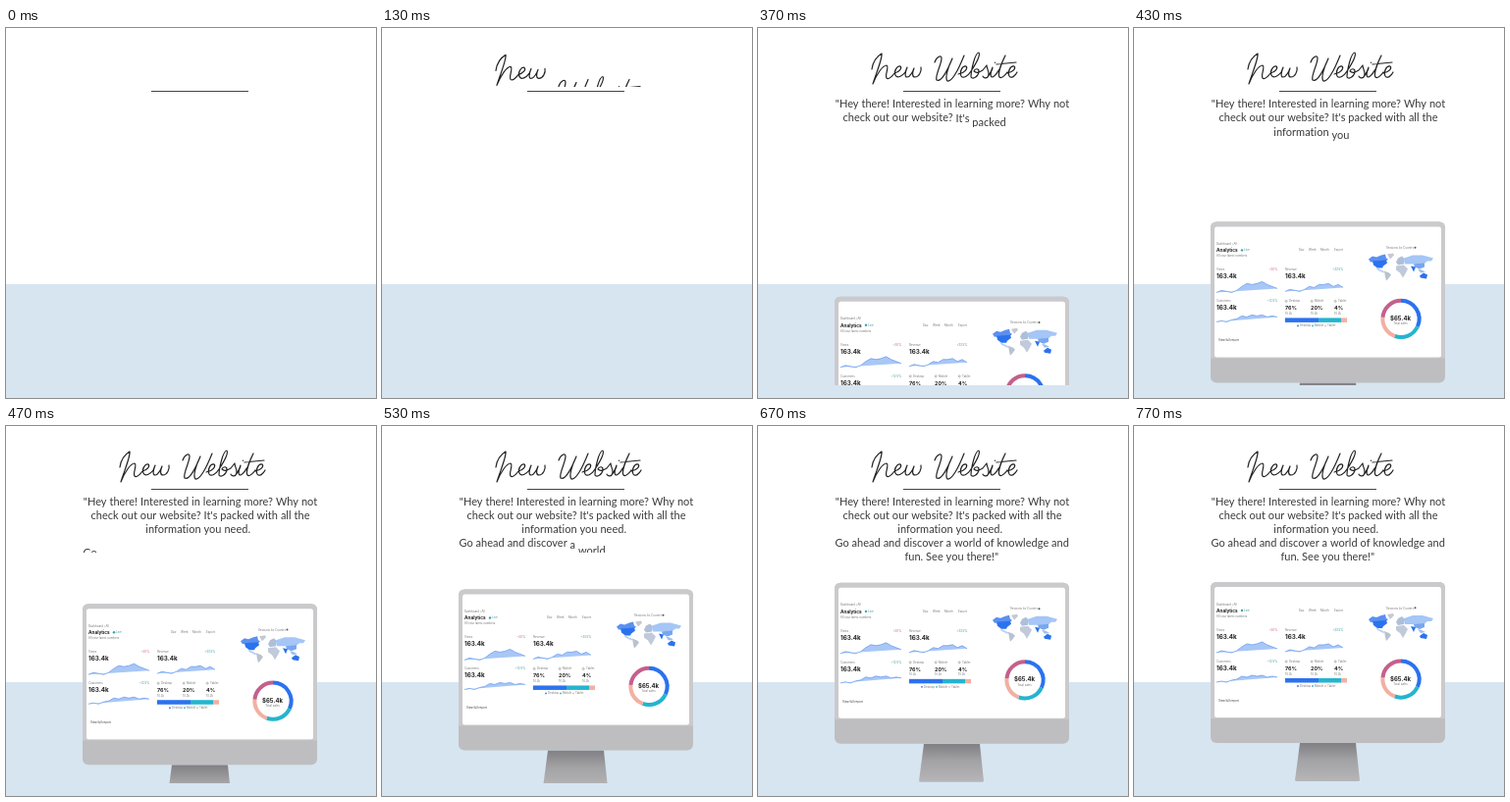
These frames come from a looping animation (377 px wide and 377 px high, 1.51 s). An HTML page:

```html
<!DOCTYPE html>
<html lang="en">
<head>
<meta charset="utf-8">
<title>New Website</title>
<style>
  html, body { margin: 0; width: 100%; height: 100%; overflow: hidden; background: #fff; }
  svg { position: absolute; left: 0; top: 0; }
  .line {
    position: absolute; width: 300px; text-align: center; white-space: nowrap;
    font: 11px/14px Lato, sans-serif; letter-spacing: .03px; color: #3a3a3a;
    clip-path: inset(-2px -9px -3px);
  }
  .line span { display: inline-block; }
</style>
</head>
<body>
<svg width="377" height="377" font-family="Inter, sans-serif">
  <defs>
    <linearGradient id="stand" x2="0" y2="1">
      <stop stop-color="#808084"/><stop offset=".45" stop-color="#a3a3a6"/><stop offset="1" stop-color="#b6b6b9"/>
    </linearGradient>
  </defs>
  <rect y="261" width="377" height="116" fill="#d7e5f1"/>
  <path d="M148 64.5H247" stroke="#444"/>

  <svg x="100" y="20" width="180" height="40" viewBox="100 20 180 40" role="img" aria-label="New Website"
       fill="none" stroke="#222" stroke-width="1.2" stroke-linecap="round" stroke-linejoin="round">
    <path class="title" d="M116 42C117 35 121 29 126 26C127 31 120 47 117 57C121 47 127 38 131 38C134 39 129 48 131 51C133 53 137 49 139 46
      C144 45 147 41 145 39C142 38 138 44 140 48C142 52 147 49 150 45L152 40C150 45 149 50 152 50C155 50 158 44 159 41
      C157 46 157 50 160 50C164 50 167 44 166 40"/>
    <path class="title" d="M180 35C182 29 187 27 187 31C187 37 180 49 182 53C187 56 194 41 198 31C194 39 190 51 193 54C199 55 206 38 210 28
      M204 47C211 46 214 41 212 39C208 38 205 45 207 49C209 52 214 49 217 44C221 38 227 28 225 25C221 25 217 44 217 50
      C219 53 225 49 225 44C225 41 221 41 220 44C222 46 226 45 229 43L233 38C233 42 237 46 234 50C232 52 229 50 229 49
      M234 50C237 46 239 41 239 40C237 45 236 50 239 50C242 49 244 45 246 42M241.5 35v.3
      M252 28C248 36 244 47 246 50C248 52 252 48 254 45M243 37L263 35
      M254 46C260 45 263 41 261 39C257 38 254 45 256 49C258 52 262 49 264 45"/>
  </svg>

  <svg x="77" y="159" width="241" height="205" viewBox="77 159 241 205">
    <g id="monitor">
      <path d="M169 323H226L230 361Q230 362 228 362H166Q164 362 164 361Z" fill="url(#stand)"/>
      <rect x="78" y="159" width="239" height="164" rx="6" fill="#bebec0"/>
      <path d="M78 298V165Q78 159 84 159H311Q317 159 317 165V298Z" fill="#cacacd"/>
      <rect x="82" y="164" width="231" height="133" rx="2.5" fill="#fff"/>
      <g id="screen"></g>
    </g>
  </svg>
</svg>

<script>
const $ = id => document.getElementById(id);
const BLUE = '#2b72ee', TEAL = '#25b4ce', SALMON = '#f2b0a2', PLUM = '#c4608c', GREY = '#777';

// Dashboard parts
const text = (x, y, size, str, fill = GREY, weight = 400, anchor = 'start') =>
  `<text x="${x}" y="${y}" font-size="${size}" fill="${fill}" font-weight="${weight}" text-anchor="${anchor}">${str}</text>`;
const tiny = (x, y, str, fill, anchor) => text(x, y, 2.9, str, fill, 400, anchor);
const bold = (x, y, size, str, anchor) => text(x, y, size, str, '#222', 700, anchor);
const shape = (d, fill) => `<path d="${d}" fill="${fill}"/>`;
const bar = (x, w, fill) => `<rect x="${x}" y="257" width="${w}" height="4.5" fill="${fill}"/>`;

// A line with the space between it and its chord shaded
function chart(x, w, base, heights) {
  const step = w / (heights.length - 1);
  const pts = heights.map((h, i) => `${x + i * step} ${base - h}`).join('L');
  return shape(`M${pts}Z`, '#a9c7f6') +
    `<path d="M${pts}" fill="none" stroke="#6a9df0" stroke-width=".8" stroke-linejoin="round"/>`;
}

function card(x, y, right, label, change, color, heights) {
  return tiny(x, y, label) + tiny(right, y, change, color, 'end') +
    bold(x, y + 8, 6.3, '163.4k') + chart(x, right - x, y + 24 - (y > 230 ? 2 : 0), heights);
}

function arc(from, to, color) {
  const at = a => `${272 + 18.6 * Math.sin(a * Math.PI / 180)} ${258 - 18.6 * Math.cos(a * Math.PI / 180)}`;
  return `<path d="M${at(from)}A18.6 18.6 0 0 1 ${at(to)}" fill="none" stroke="${color}" stroke-width="4"/>`;
}

const share = (x, label, value) =>
  `<circle cx="${x + 1.2}" cy="240" r="1" fill="none" stroke="${GREY}" stroke-width=".5"/>` +
  tiny(x + 4, 241, label) + bold(x, 249, 5.4, value) + tiny(x, 253.5, '10.2k');

const map =
  shape('M239 197L243 194L247 195L252 193L256 192L257 196L259 197L257 199L241 200Z', '#5a90f0') +
  shape('M243 199L257 198L258 201L254 204L253 206L248 206L244 203Z', BLUE) +
  shape('M258 192L264 191L265 193L261 197Z', '#c4c9d2') +
  shape('M246 205L250 207L256 210L254 211L248 208Z', '#b9cff2') +
  shape('M255 209L260 211L262 213L259 217L257 219L256 215Z', '#b9c2d0') +
  shape('M267 200L269 196L273 194L276 197L275 202L269 203Z', '#aebfd8') +
  shape('M267 204L275 203L279 207L277 211L274 216L271 211L267 208Z', '#c0cada') +
  shape('M275 196L284 193L294 193L305 196L303 199L299 199L294 203L284 202L276 202Z', '#a5c6f6') +
  shape('M285 202L296 201L296 205L291 207L286 205Z', '#78a7f1') +
  shape('M282 204L287 205L285 210Z', BLUE) +
  shape('M289 207L293 208L297 210L292 211Z', '#9fbdec') +
  shape('M291 214L295 211L299 213L298 217L292 216Z', BLUE);

$('screen').innerHTML =
  tiny(84, 182.5, 'Dashboard / All') + bold(84, 190, 4.7, 'Analytics') +
  '<circle cx="110" cy="188" r="1.2" fill="#3ba0a8"/>' + tiny(112, 189, 'Live', '#3b8e96') +
  tiny(84, 195, 'All your latest numbers') +
  tiny(168, 189, 'Day') + tiny(178, 189, 'Week') + tiny(190, 189, 'Month') + tiny(204, 189, 'Export') +
  card(84, 209, 146, 'Views', '+20%', '#c45a7a', [2, 4, 3, 2, 4, 8, 11, 10, 11, 13, 10, 8, 6]) +
  card(154, 209, 213, 'Revenue', '+33.5%', '#35959a', [3, 5, 4, 3, 5, 8, 7, 10, 10, 11, 8, 10, 7]) +
  card(84, 241, 146, 'Customers', '+12.5%', '#35959a', [2, 3, 2, 4, 5, 8, 7, 9, 8, 9, 7, 8, 7]) +
  share(154, 'Desktop', '76%') + share(180, 'Mobile', '20%') + share(204, 'Tablet', '4%') +
  bar(154, 34, BLUE) + bar(188, 23, TEAL) + bar(211, 6, SALMON) +
  [[167, BLUE], [182, TEAL], [195, SALMON]].map(([x, c]) => `<circle cx="${x}" cy="265" r=".9" fill="${c}"/>`).join('') +
  tiny(169, 266, 'Desktop') + tiny(184, 266, 'Mobile') + tiny(197, 266, 'Tablet') +
  tiny(86, 281, 'View full report', '#333') +
  tiny(271, 186.5, 'Sessions by Country', GREY, 'middle') +
  '<circle cx="286.5" cy="185.3" r="1" fill="#555"/>' + map +
  arc(0, 115, BLUE) + arc(115, 200, TEAL) + arc(200, 275, SALMON) + arc(275, 360, PLUM) +
  bold(271.5, 259.5, 6, '$65.4k', 'middle') + tiny(271.5, 264, 'Total sales', GREY, 'middle');

// Paragraph: each line with its centre; an empty word takes a turn at the paragraph break
const words = [];
[
  ['"Hey there! Interested in learning more? Why not', 198],
  ["check out our website? It's packed with all the", 198],
  ['information you need.', 195.7],
  ['Go ahead and discover a world of knowledge and', 197.7],
  ['fun. See you there!"', 197.3],
].forEach(([str, centre], i) => {
  const line = document.createElement('div');
  line.className = 'line';
  line.style.left = centre - 150 + 'px';
  line.style.top = 70 + 14 * i + 'px';
  if (i === 3) words.push(null);
  str.split(' ').forEach((w, k) => {
    const span = document.createElement('span');
    span.textContent = w;
    if (k) line.append(' ');
    line.append(span);
    words.push(span);
  });
  document.body.append(line);
});

// Motion
const LOOP = 1510, STEP = 100 / 3;
const titles = document.querySelectorAll('.title');

function rise(el, x, duration, distance) {
  const p = Math.max(0, x / duration);
  const left = p < 1 ? distance * 2 ** (-10 * p) : 0;
  el.style.visibility = x < 0 ? 'hidden' : 'visible';
  el.style.transform = `translateY(${left}px)`;
}

function draw(now) {
  // The picture moves in 30 steps a second, timed to whole hundredths
  const tick = Math.floor((now % LOOP) / 10) * 10 + 9.99 - 70;
  const t = tick < 0 ? 0 : 70 + STEP * Math.min(21, Math.floor(tick / STEP));
  titles.forEach((el, i) => rise(el, t - 80 - 50 * i, 120, 36));
  words.forEach((el, i) => el && rise(el, t - 191.6 - 13.1 * i, 53, 15));
  rise($('monitor'), t - 335, 422, 204);
  requestAnimationFrame(draw);
}
draw(0);
</script>
</body>
</html>
```
